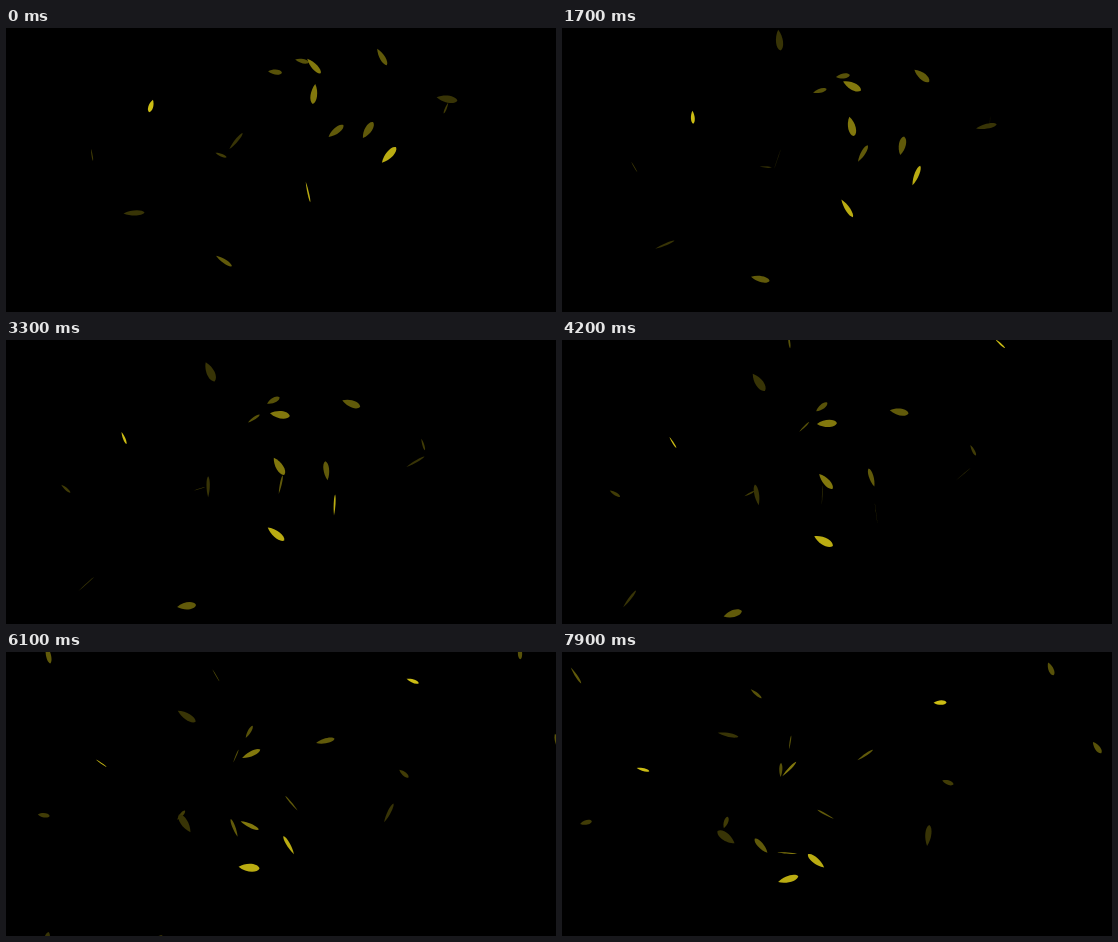
An HTML page with a canvas that plays this animation: 550x284 px, repeating every 8000 ms.

```html
<!DOCTYPE html>
<html lang="en">
<head>
<meta charset="utf-8">
<title>Drifting leaves</title>
<style>
  html, body { margin: 0; width: 100%; height: 100%; overflow: hidden; background: #000; }
  canvas { display: block; }
</style>
</head>
<body>
<canvas id="stage" width="550" height="284"></canvas>
<script>
const ctx = document.getElementById('stage').getContext('2d');

const LOOP = 8000;
const STEP = 175;      // the picture is held this long
const LEAD = 50;       // the first hold is shorter by this much
const SPIN = -95;      // degrees every leaf turns in one loop
const FLIP = 2;        // radians every leaf rolls about its long axis
const SAG = 3.5;       // how far the paths bow downwards
const BREADTH = 0.38;  // width to length of a leaf seen face on

const leaves = [];

// Each leaf drifts from one point to another. Its angle is the one it has
// halfway, and edgeOn is the part of the loop at which it shows only its edge.
function leaf(length, lightness, from, to, angle, edgeOn) {
  leaves.push({ length, lightness, from, to, angle, edgeOn });
}

const dimSmall = leaf.bind(null, 12, 14);
const dimLarge = leaf.bind(null, 21, 12);
const midSmall = leaf.bind(null, 14, 19);
const midLarge = leaf.bind(null, 19, 21);
const lightLarge = leaf.bind(null, 20, 28);
const brightSmall = leaf.bind(null, 13, 44);
const brightLarge = leaf.bind(null, 21, 40);

dimSmall([86, 127], [23, 171], 33, .13);
dimSmall([215, 127], [163, 171], -25, .35);
dimSmall([440, 80], [385, 131], 65, .2);

dimLarge([441, 71], [365, 185], -38, .55);
dimLarge([230, 113], [163, 186], -98, .2);
dimLarge([128, 185], [13, 319], -50, .36);
dimLarge([232, -11], [165, 84], 57, 1.25);

midSmall([269, 44], [218, 119], -42, .67);
midSmall([296, 33], [227, 91], -35, 1.1);
midSmall([265, -52], [193, 43], 85, .7);
midSmall([602, -68], [487, 18], 113, .3);
midSmall([606, 53], [534, 96], 99, .3);

midLarge([376, 29], [302, 104], 12, 1.15);
midLarge([330, 103], [197, 195], -86, .55);
midLarge([362, 102], [262, 163], -105, .87);
midLarge([218, 233], [128, 304], -14, -.3);
midLarge([141, -83], [12, 25], 103, 1.15);

lightLarge([308, 38], [226, 118], 0, 1.15);
lightLarge([308, 66], [224, 203], 50, 1.05);

brightSmall([145, 78], [80, 118], 60, .67);
brightSmall([507, -57], [376, 52], 45, .35);

brightLarge([383, 127], [252, 210], -95, .53);
brightLarge([302, 164], [225, 228], 30, -.1);

const mix = (a, b, u) => a + (b - a) * u;

function drawLeaf({ length, lightness, from, to, angle, edgeOn }, u) {
  const tip = length / 2;
  const side = length * BREADTH * 2 / 3 * Math.sin(FLIP * (u - edgeOn));

  ctx.save();
  ctx.translate(mix(from[0], to[0], u), mix(from[1], to[1], u) + SAG * 4 * u * (1 - u));
  ctx.rotate((angle + SPIN * (u - .5)) * Math.PI / 180);
  ctx.beginPath();
  ctx.moveTo(-tip, 0);
  ctx.bezierCurveTo(-tip * .3, -side, tip * .8, -side, tip, 0);
  ctx.bezierCurveTo(tip * .8, side, -tip * .3, side, -tip, 0);
  ctx.fillStyle = `hsl(55, 82%, ${lightness}%)`;
  ctx.fill();
  ctx.restore();
}

function draw() {
  const time = performance.now() % LOOP;
  const held = Math.floor((time + LEAD) / STEP) * STEP;
  ctx.fillStyle = '#000';
  ctx.fillRect(0, 0, 550, 284);
  for (const item of leaves) drawLeaf(item, held / LOOP);
  requestAnimationFrame(draw);
}
draw();
</script>
</body>
</html>
```
